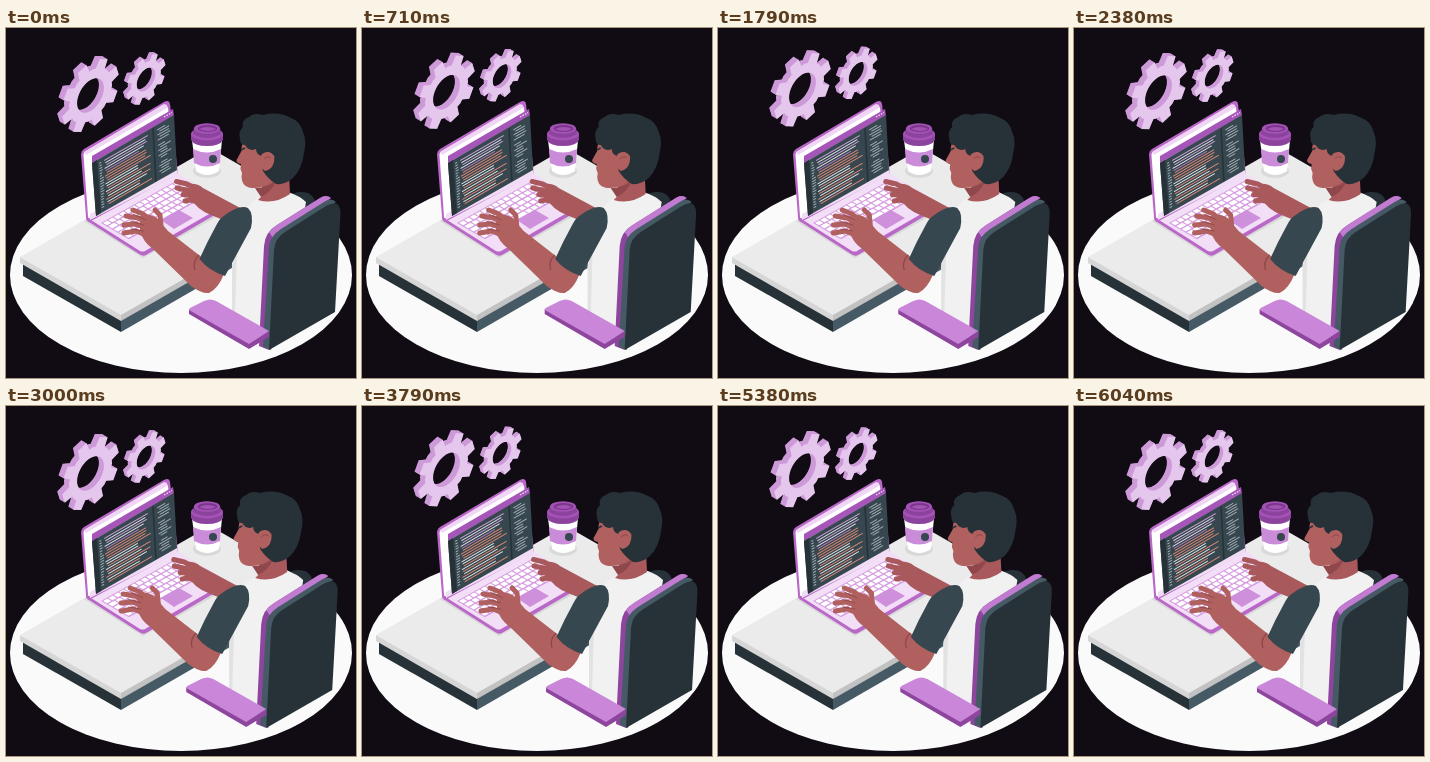
Recreate the animation shown at these times as an HTML page. Size 350 by 350 pixels, loop 6.08 s.

```html
<!DOCTYPE html>
<html lang="en">
<head>
<meta charset="utf-8">
<title>Coding at a desk</title>
<style>
  html, body { margin: 0; height: 100%; overflow: hidden; background: #110c14; }
  svg { display: block; width: 100%; height: 100%; }
</style>
</head>
<body>
<svg viewBox="0 0 350 350">
  <ellipse cx="175" cy="247" rx="171" ry="98" fill="#fafafa"/>

  <!-- desk -->
  <path fill="#263238" d="M17 234 115 290V304L17 248Z"/>
  <path fill="#455a64" d="M115 290 290 189V203L115 304Z"/>
  <path fill="#d6d6d6" d="M14 229 115 286V293L14 235Z"/>
  <path fill="#c2c2c2" d="M115 286 305 177V184L115 293Z"/>
  <path fill="#ebebeb" d="M14 229 204 120 305 178 115 287Z"/>

  <!-- laptop -->
  <path fill="#d8d8d8" d="M78 193 137 230 228 179 172 148Z"/>
  <path fill="#ba68c8" d="M80 189 171 146 219 174Q224 178 219 181L140 227Q137 229 133 226L83 194Q80 192 80 189Z"/>
  <path fill="#f3def7" d="M82 189 171 145 217 173Q221 176 217 178L139 223Q137 224 134 223L85 192Z"/>
  <g transform="matrix(1 -.56 1 .58 97 195)" stroke="#fff">
    <path fill="#d79be2" stroke="none" d="M-1-1H75V27H-1Z"/>
    <path stroke-width="4" stroke-dasharray="4.3 1.1" d="M0 2H74M0 18H74"/>
    <path stroke-width="4" stroke-dasharray="6 1.1 4.3 1.1 4.3 1.1 4.3 1.1" d="M0 7.3H74M0 12.7H74"/>
    <path stroke-width="4" stroke-dasharray="4.3 1.1 4.3 1.1 4.3 1.1 27 1.1 4.3 1.1" d="M0 23.5H74"/>
  </g>
  <path fill="#ce8fdb" d="M155 192 173 182 187 190 168 201Z"/>
  <path fill="#ba68c8" d="M75 126Q75 123 78 121L158 74Q163 71 164 76L172 146 83 194Q80 193 80 189Z"/>
  <path fill="#fff" d="M77.500 127Q77 125 80 123L157 78Q161 76 162 80L169 144 84 190Q82 191 82 188Z"/>
  <path fill="#f0d6f5" d="M78 124 158 76 161 77 161 80 80 127Z"/>
  <path fill="#f1dcf5" d="M84 186 171 139 172 147 84 192Z"/>
  <path fill="#a656b8" d="M86 128 167 81 168 88 86 135Z"/>
  <path fill="#37474f" d="M86 135 168 87 171 142 90 188Z"/>
  <path fill="#263238" d="M86 135 91 132 95 185 90 188Z"/>
  <path stroke="#f3def7" stroke-width="1.400" stroke-dasharray="1.500 1.300" d="M158 89 166 84.500"/>
  <g id="code" transform="matrix(1 -.58 .055 1 87 135)"></g>

  <!-- cup -->
  <ellipse cx="201" cy="143" rx="14" ry="7" fill="#d9d9d9"/>
  <path fill="#fff" d="M186 112H216L213 143Q201 151 190 143Z"/>
  <path fill="#ca8bd8" d="M187 121Q201 128 215 121L214 135Q201 142 188 135Z"/>
  <circle cx="207" cy="131" r="4" fill="#37474f"/>
  <path fill="#8c439d" d="M185 106V112Q188 118 201 118T217 112V106Z"/>
  <ellipse cx="201" cy="106" rx="16" ry="6.500" fill="#a552b7"/>
  <path fill="#8c439d" d="M188 100H214L215 106Q201 114 187 106Z"/>
  <ellipse cx="201" cy="100.500" rx="13" ry="5.300" fill="#a552b7"/>
  <ellipse cx="201.500" cy="100.500" rx="10" ry="3.600" fill="#7b388b"/>
  <path fill="#a552b7" d="M193 101Q202 97 210 101 202 105 193 101Z"/>

  <g id="gears"></g>

  <!-- person and chair -->
  <g id="person">
    <g stroke="#a9595b" stroke-linecap="round" stroke-linejoin="round" fill="none">
      <path fill="#a9595b" stroke="none" d="M183 156Q191 155 197 160L238 182 222 194 205 187Q190 181 186 171Z"/>
      <path stroke-width="5" d="M192 162 181 156 170.500 153.500M191 165 180 162 171 160M190 168 177 166.500M193 174 184 172 179 173"/>
    </g>

    <path fill="#263238" d="M283 168Q291 162 302 165 309 168 309 177L290 190Z"/>
    <path fill="#f1f1f1" d="M240 180Q248 171 256 169L282 164Q294 168 300 174L280 300 262 302 226 284V225Z"/>
    <path fill="#e2e2e2" d="M226 238 231 222 229 285 226 284Z"/>
    <path fill="#a9595b" d="M256 150 283 145 284 166Q268 177 252 172L256 168Z"/>
    <path fill="#8f474b" d="M249 160Q262 160 270 152 267 163 255 169Z"/>
    <path fill="#b0605f" d="M239 108Q235 118 235.500 123L230.500 132Q230 135 235 136L234.500 141 236 145 235.500 149Q236 158 243 159.500 256 162 266 153L284 140 275 105Z"/>
    <path fill="#263238" d="M234 111Q232 103 237 99 235 92 243 89 248 84 257 87 272 83 285 90 294 93 297 104 301 113 298 125 296 141 287 150 279 157 270 156 262 151 257 143L255 128Q250 126 250 121 243 124 239 117 234 117 234 111Z"/>
    <path fill="#b0605f" d="M254 130Q256 123 263 124 270 126 268 134 266 142 259 143 254 140 254 130Z"/>
    <path fill="none" stroke="#8f474b" d="M258 131Q262 127 265 130"/>
    <path fill="none" stroke="#263238" stroke-width="1.500" d="M235 122 239 120"/>

    <!-- near arm -->
    <g stroke="#b0605f" stroke-linecap="round" stroke-linejoin="round" fill="none">
      <path fill="#b0605f" stroke="none" d="M134 188Q142 184 151 190L162 203 198 231 218 246Q212 261 203 265 196 266 185 258L147 221Q137 214 134 203Z"/>
      <path stroke-width="5" d="M146 194 137 186 127 182M142 195 132 190 120 188M139 199 129 196 118 197M140 207 130 203 118 205M155 197 154 187 149 182"/>
    </g>
    <path fill="none" stroke="#8f474b" stroke-width="1.300" d="M193 227Q186 234 189 242"/>
    <path fill="none" stroke="#8f474b" stroke-width=".8" d="M127 186 140 192M124 193 138 197M125 201 138 203"/>
    <path fill="#37474f" d="M219 187Q234 176 242 180 248 186 245 200L219 248Q203 243 193.500 231Q201 214 211 196 214 190 219 187Z"/>

    <path fill="#8d459e" d="M253 318 258 218Q259 204 271 197L314 170Q320 166 325 170L280 206 263 322Z"/>
    <path fill="#c17bd0" d="M263 204Q266 200 271 197L314 170Q320 166 325 170L276 202 267 210Z"/>
    <path fill="#455a64" d="M257 319 263 219Q264 208 275 201L318 174Q325 169 330 174L283 210 265 322Z"/>
    <path fill="#263238" d="M263 322 268 222Q269 210 279 204L320 178Q334 170 334.500 185L329 284Z"/>
    <path fill="#8d459e" d="M183 281V286L243 321 263 309V303L243 315Z"/>
    <path fill="#ca86d9" d="M184 280 198 273Q204 270 210 273L263 303 243 316 183 282Z"/>
  </g>
</svg>
<script>
const $ = id => document.getElementById(id);
const LOOP = 6080;

// Eight-toothed wheel with a hole, lying in an isometric plane
function gearPath() {
  const at = (deg, r) => {
    const a = deg * Math.PI / 180, x = r * Math.cos(a), y = r * Math.sin(a);
    return `${(.866 * x).toFixed(2)} ${(y - .5 * x).toFixed(2)}`;
  };
  const rim = [], hole = [];
  for (let a = -62; a < 298; a += 45) {
    rim.push(at(a - 14, 24.5), at(a - 9, 33), at(a + 9, 33), at(a + 14, 24.5), at(a + 22, 25));
  }
  for (let a = 0; a < 360; a += 10) hole.push(at(a, 15.5));
  return `M${rim.join('L')}ZM${hole.join('L')}Z`;
}

function gear(x, y, scale) {
  const d = gearPath();
  let out = `<g transform="translate(${x} ${y}) scale(${scale})" fill-rule="evenodd">`;
  for (let i = 10; i >= 0; i--) {
    out += `<path d="${d}" fill="${i ? '#cd9ad8' : '#e5c6ec'}" transform="translate(${-i / 2} ${-i * .3})"/>`;
  }
  return out + '</g>';
}
$('gears').innerHTML = gear(84.5, 67.5, 1) + gear(140, 51.5, .69);

// Lines of code on the screen
let seed = 7;
const rand = () => (seed = seed * 16807 % 2147483647) / 2147483647;
const bar = (x, y, w, color) =>
  `<path d="M${x} ${y}h${w.toFixed(1)}" stroke="${color}" stroke-width="1"/>`;
const colors = ['#d8a5e2', '#e8eaec', '#e58b76', '#e58b76', '#b87fc8'];
let lines = '';
for (let i = 0; i < 18; i++) {
  const y = 4 + i * 2.6;
  const color = i < 4 ? colors[i % 2] : colors[Math.floor(rand() * 5)];
  lines += bar(6, y, 2 + rand() * 2, '#a9b4ba');
  lines += bar(11 + (i % 3), y, 26 + rand() * 19, color);
  if (i % 7 != 5) lines += bar(64 + (i % 2) * 2, y, 6 + rand() * 7, '#a9b4ba');
}
$('code').innerHTML = lines + '<path d="M60 0V53" stroke="#263238" stroke-width="1.5"/>';

const shake = [0, -1, 2, -4, 4, -4, 4, -4, 2, -1, 0];

function draw() {
  const t = performance.now() % LOOP;
  const k = t % 6000 / 600, i = Math.floor(k);
  const dx = .7 * (shake[i] + (shake[i + 1] - shake[i]) * (k - i));
  const dy = -7 * (1 - Math.abs(1 - t % 3000 / 1500));
  $('person').setAttribute('transform', `translate(${dx} 0)`);
  $('gears').setAttribute('transform', `translate(0 ${dy})`);
  requestAnimationFrame(draw);
}
draw();
</script>
</body>
</html>
```
